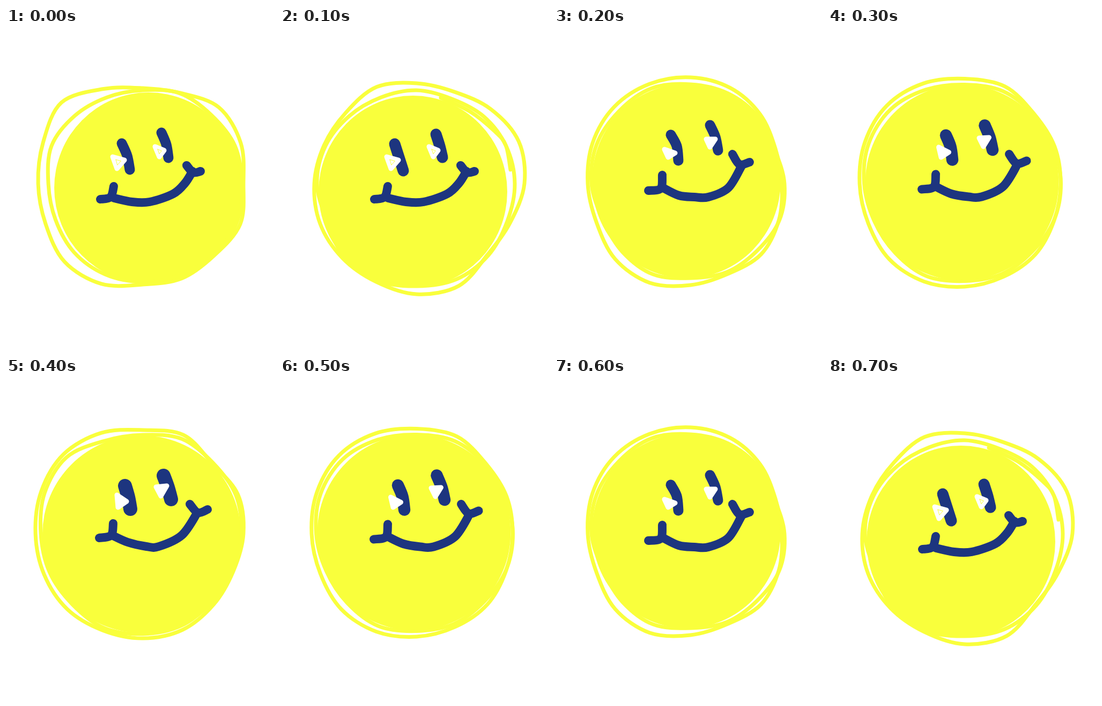
Animation, 500 px wide and 600 px high, one loop 0.8 s. Source, as an HTML page with a canvas:

```html
<!DOCTYPE html>
<html lang="en">
<head>
<meta charset="utf-8">
<title>Scribbled smiley</title>
<style>
html, body { margin: 0; height: 100%; overflow: hidden; background: #fff; }
canvas { display: block; }
</style>
</head>
<body>
<canvas id="stage" width="500" height="600"></canvas>
<script>
const YELLOW = '#f9ff3c', BLUE = '#1d357f', WHITE = '#fff';
const ctx = document.getElementById('stage').getContext('2d');
ctx.lineCap = ctx.lineJoin = 'round';

// body: ellipse x, y, rx, ry. outer, inner: radii of the scribbled rings,
// evenly spaced clockwise from the top. The rest are points x, y, x, y, ...
const lowFace = {
  cheekL: [176,319, 195,315, 201,295],
  mouth: [202,317, 235,324, 268,324, 312,309, 334,289, 348,267],
  cheekR: [337,256, 349,269, 363,267],
  shineL: [199,240, 221,246, 207,262],
  shineR: [278,221, 295,228, 286,240],
  slit: [1]
};

const leaning = {
  ...lowFace, eye: [19],
  eyeL: [216,215, 226,238, 231,264],
  eyeR: [290,195, 299,217, 303,242],
  body: [266,298,176,178],
  outer: [178,183,201,198,188,197,189,191,188,202,206,196,195,201,214,191],
  inner: [174,182,181,186,185,190,187,184,183,183,181,176,176,184,179,174]
};

const wide = {
  ...lowFace, eye: [21],
  eyeL: [214,216, 222,241, 230,266],
  eyeR: [291,198, 298,220, 303,241],
  body: [248,305,176,179],
  outer: [187,185,196,206,201,189,187,206,206,198,196,195,191,187,187,195],
  inner: [174,171,177,181,183,183,189,193,191,195,192,181,186,184,178,174],
  tail: [300,130, 355,156, 400,192, 421,218, 430,264]
};

const tall = {
  eye: [19], slit: [0],
  eyeL: [218,199, 229,220, 232,247],
  eyeR: [291,181, 301,203, 306,228],
  cheekL: [176,303, 199,299, 202,274],
  mouth: [202,297, 233,312, 262,315, 288,315, 325,298, 350,257],
  cheekR: [333,235, 346,254, 365,250],
  shineL: [206,226, 226,233, 213,241],
  shineR: [284,207, 301,207, 291,222],
  body: [247,285,176,181],
  outer: [198,193,183,171,170,178,186,182,189,200,199,190,192,198,202,201],
  inner: [185,182,177,169,175,179,176,178,176,183,180,177,185,190,190,192]
};

const round = {
  eye: [26], slit: [0],
  eyeL: [222,201, 228,222, 232,244],
  eyeR: [294,182, 302,204, 308,226],
  cheekL: [174,298, 196,293, 200,271],
  mouth: [198,293, 227,306, 262,314, 285,314, 328,293, 357,251],
  cheekR: [343,235, 358,251, 376,245],
  shineL: [207,218, 225,230, 209,241],
  shineR: [280,203, 300,201, 289,220],
  body: [253,291,185,184],
  outer: [193,199,184,192,188,183,187,194,195,195,199,199,200,205,209,203],
  inner: [184,191,186,188,184,181,181,186,187,190,186,188,190,198,201,187]
};

const between = {};
for (const key in tall) between[key] = tall[key].map((v, i) => (v + round[key][i]) / 2);

// Smooth curve through all points.
function curve(list, closed) {
  const n = list.length / 2, path = new Path2D();
  const pt = i => {
    const k = closed ? (i + n) % n : Math.min(Math.max(i, 0), n - 1);
    return [list[2 * k], list[2 * k + 1]];
  };
  path.moveTo(...pt(0));
  for (let i = 0; i < (closed ? n : n - 1); i++) {
    const [a, b, c, d] = [pt(i - 1), pt(i), pt(i + 1), pt(i + 2)];
    path.bezierCurveTo(b[0] + (c[0] - a[0]) / 6, b[1] + (c[1] - a[1]) / 6,
      c[0] - (d[0] - b[0]) / 6, c[1] - (d[1] - b[1]) / 6, ...c);
  }
  if (closed) path.closePath();
  return path;
}

function line(list, color, width, closed) {
  ctx.strokeStyle = color;
  ctx.lineWidth = width;
  ctx.stroke(curve(list, closed));
}

function ring(radii) {
  const points = radii.flatMap((r, i) => {
    const a = i / radii.length * 2 * Math.PI;
    return [255 + r * Math.sin(a), 290 - r * Math.cos(a)];
  });
  line(points, YELLOW, 7, true);
}

function triangle(list, scale, color, width) {
  const mid = axis => (list[axis] + list[axis + 2] + list[axis + 4]) / 3;
  const p = list.map((v, i) => mid(i % 2) + (v - mid(i % 2)) * scale);
  ctx.beginPath();
  for (let i = 0; i < 6; i += 2) ctx.lineTo(p[i], p[i + 1]);
  ctx.closePath();
  ctx.fillStyle = WHITE;
  ctx.strokeStyle = color;
  ctx.lineWidth = width;
  ctx.fill();
  ctx.stroke();
}

function draw(pose) {
  ctx.fillStyle = WHITE;
  ctx.fillRect(0, 0, 500, 600);
  ctx.fillStyle = YELLOW;
  ctx.beginPath();
  ctx.ellipse(...pose.body, 0, 0, 2 * Math.PI);
  ctx.fill();
  ring(pose.outer);
  ring(pose.inner);
  if (pose.tail) line(pose.tail, YELLOW, 7);
  for (const eye of [pose.eyeL, pose.eyeR]) line(eye, BLUE, pose.eye[0]);
  for (const part of [pose.cheekL, pose.mouth, pose.cheekR]) line(part, BLUE, 16);
  for (const shine of [pose.shineL, pose.shineR]) {
    triangle(shine, 1, WHITE, 9);
    if (pose.slit[0]) triangle(shine, 0.45, YELLOW, 1);
  }
}

const cycle = [leaning, wide, tall, between, round, between, tall, wide];
const start = performance.now();
function tick() {
  draw(cycle[Math.floor((performance.now() - start) / 100) % cycle.length]);
  requestAnimationFrame(tick);
}
tick();
</script>
</body>
</html>
```
